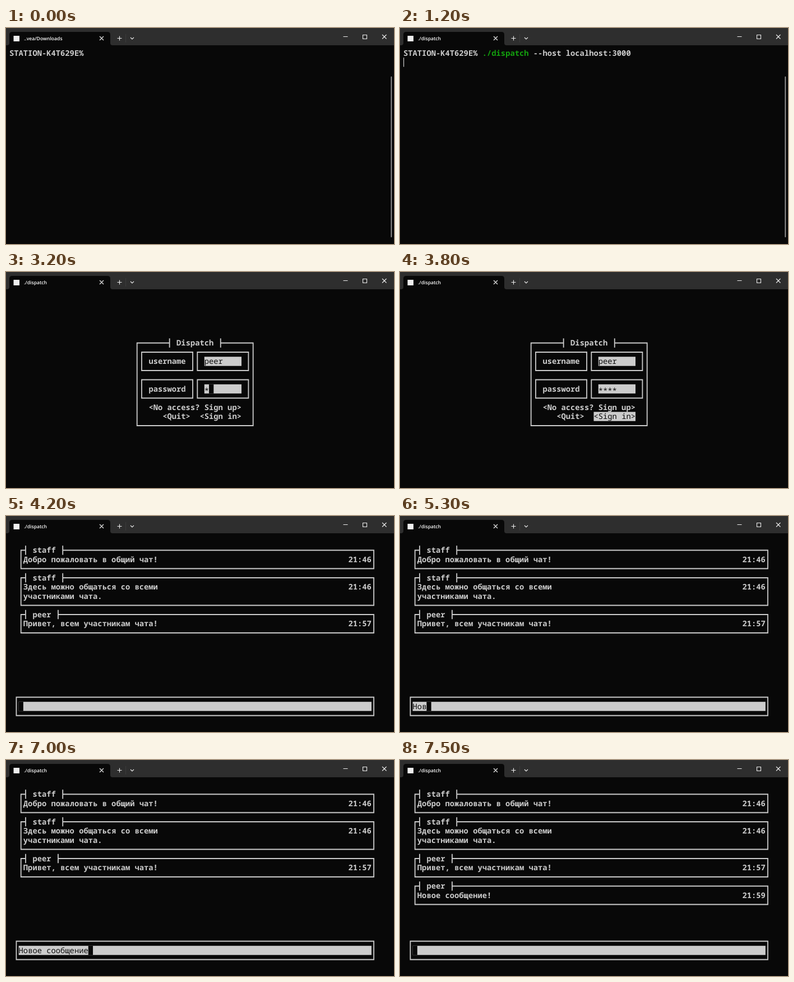
Write an HTML page that moves like this. It is 692 by 388 pixels and loops after 8.5 s.

```html
<!DOCTYPE html>
<html lang="en">
<head>
<meta charset="utf-8">
<title>Terminal chat</title>
<style>
  html, body { margin: 0; width: 100%; height: 100%; overflow: hidden; background: #080808; }
  svg { display: block; width: 692px; height: 388px; }
  text { white-space: pre; text-rendering: geometricPrecision; }
  .mono { font: 600 13.8px "Noto Sans Mono", "DejaVu Sans Mono", monospace; fill: #ccc; }
  .mono.dark { font-weight: 400; fill: #0c0c0c; }
  .mono.green { fill: #13a10e; }
  .frame { fill: none; stroke: #ccc; stroke-width: 1.8; }
  .light { fill: #ccc; }
  .tab { font: 600 8.6px "Open Sans", "Noto Sans", sans-serif; fill: #fff; }
  .icon { fill: none; stroke: #eee; stroke-width: 1.1; }
</style>
</head>
<body>
<svg id="stage" viewBox="0 0 692 388">
  <rect width="692" height="388" fill="#080808"/>
  <rect width="692" height="31" fill="#2e2e2e"/>
  <path d="M2 31Q6 31 6 27V12Q6 7 11 7H181Q186 7 186 12V27Q186 31 190 31Z" fill="#080808"/>
  <rect x="13.5" y="14" width="10.5" height="10" fill="#eee"/>
  <text id="tab" class="tab" x="32" y="22.3"></text>
  <path class="icon" d="M167 15l7 7m0-7l-7 7M198.500 18.500h8m-4-4v8M222 17l3 3 3-3"/>
  <path d="M213.500 11v15" stroke="#3c3c3c"/>
  <path class="icon" d="M601.500 15.500h8M636.500 12.500h7v7h-7zM671 12l7.500 7.500m0-7.500l-7.500 7.500"/>
</svg>
<script>
const LOOP = 8500, CW = 8.28, RH = 16.5;
const stage = document.getElementById('stage');
const tab = document.getElementById('tab');
const updates = [];

const left = col => 6 + col * CW;
const midX = col => left(col + 0.5);
const midY = row => 45 + row * RH;
const within = (t, [from, to]) => t >= from && t < to;

function add(parent, tag, attrs = {}) {
  const el = document.createElementNS('http://www.w3.org/2000/svg', tag);
  for (const key in attrs) el.setAttribute(key, attrs[key]);
  return parent.appendChild(el);
}

function show(el, ...spans) {
  updates.push(t => {
    el.style.display = spans.some(span => within(t, span)) ? '' : 'none';
  });
  return el;
}

const scene = (from, to) => show(add(stage, 'g'), [from, to]);

function write(parent, col, row, str, style = '') {
  const el = add(parent, 'text', { class: 'mono ' + style, x: left(col), y: midY(row) + 4.9 });
  el.textContent = str;
  return el;
}

function fill(parent, col, row, cells, color = '#ccc') {
  return add(parent, 'rect', {
    x: left(col), y: midY(row) - RH / 2, width: cells * CW, height: RH, fill: color
  });
}

const caret = (parent, col, row) => add(parent, 'rect', {
  class: 'light', x: left(col), y: midY(row) - RH / 2, width: 1.2, height: RH
});

// Box border; with a title, the top edge breaks around it.
function box(parent, c1, r1, c2, r2, title, titleCol) {
  const x1 = midX(c1), y1 = midY(r1), x2 = midX(c2), y2 = midY(r2);
  let d = `M${x1} ${y1}H${x2}V${y2}H${x1}Z`;
  if (title) {
    const a = midX(titleCol - 2), b = midX(titleCol + title.length + 1);
    const tick = x => `M${x} ${y1 - RH / 2}v${RH}`;
    d = `M${b} ${y1}H${x2}V${y2}H${x1}V${y1}H${a}` + tick(a) + tick(b);
    write(parent, titleCol, r1, title);
  }
  add(parent, 'path', { class: 'frame', d });
}

// Text field; keys are [time, typed length] pairs.
function field(parent, col, row, cells, str, keys, focus, drop = 0) {
  fill(parent, col, row, cells);
  const cursor = fill(parent, col, row, 1, '#080808');
  const label = write(parent, col, row, '', 'dark');
  label.setAttribute('transform', `translate(0 ${drop})`);
  updates.push(t => {
    const count = keys.reduce((n, [at, len]) => t >= at ? len : n, 0);
    label.textContent = str.slice(0, count);
    cursor.setAttribute('x', left(col + count));
    cursor.style.display = within(t, focus) ? '' : 'none';
  });
}

function button(parent, col, row, str, focus) {
  const back = show(fill(parent, col, row, str.length), focus);
  const label = write(parent, col, row, str);
  updates.push(t => label.classList.toggle('dark', within(t, focus)));
}

function message(parent, row, name, time, ...lines) {
  box(parent, 2, row, 78, row + lines.length + 1, name, 5);
  lines.forEach((line, i) => write(parent, 3, row + 1 + i, line));
  write(parent, 73, row + 1, time);
}

updates.push(t => { tab.textContent = t < 1200 ? '..vea/Downloads' : './dispatch'; });

const shell = scene(0, 1300);
write(shell, 0, 0, 'STATION-K4T629E%');
const command = show(add(shell, 'g'), [200, 1300]);
write(command, 17, 0, './dispatch', 'green');
write(command, 28, 0, '--host localhost:3000');
show(caret(shell, 49, 0), [200, 600], [1000, 1200]);
show(caret(shell, 0, 1), [1200, 1300]);
add(shell, 'rect', { x: 686.4, y: 87, width: 1.8, height: 289, rx: 0.9, fill: '#9a9a9a' });

const form = scene(1400, 4200);
box(form, 27, 5, 52, 14, 'Dispatch', 36);
for (const row of [6, 9]) {
  box(form, 28, row, 39, row + 2);
  box(form, 40, row, 51, row + 2);
}
write(form, 30, 7, 'username');
write(form, 30, 10, 'password');
field(form, 42, 7, 8, 'peer', [[1900, 2], [2000, 4]], [1400, 2800]);
field(form, 42, 10, 8, '****', [[3200, 1], [3300, 2], [3400, 4]], [2800, 3500], 2.8);
button(form, 30, 12, '<No access? Sign up>', [3500, 3700]);
button(form, 33, 13, '<Quit>', [3700, 3800]);
button(form, 41, 13, '<Sign in>', [3800, 4200]);

const chat = scene(4200, LOOP);
message(chat, 1, 'staff', '21:46', 'Добро пожаловать в общий чат!');
message(chat, 4, 'staff', '21:46', 'Здесь можно общаться со всеми', 'участниками чата.');
message(chat, 8, 'peer', '21:57', 'Привет, всем участникам чата!');
message(show(add(chat, 'g'), [7500, LOOP]), 11, 'peer', '21:59', 'Новое сообщение!');
box(chat, 1, 17, 78, 19);
field(chat, 2, 18, 76, 'Новое сообщение!', [
  [4800, 1], [5200, 2], [5300, 3], [5400, 4], [5600, 5],
  [5900, 6], [6000, 7], [6100, 9], [6200, 10],
  [6700, 11], [6800, 12], [6900, 14], [7000, 15], [7200, 16], [7400, 0]
], [4200, LOOP]);

function render() {
  const t = performance.now() % LOOP;
  updates.forEach(update => update(t));
  requestAnimationFrame(render);
}
render();
</script>
</body>
</html>
```
